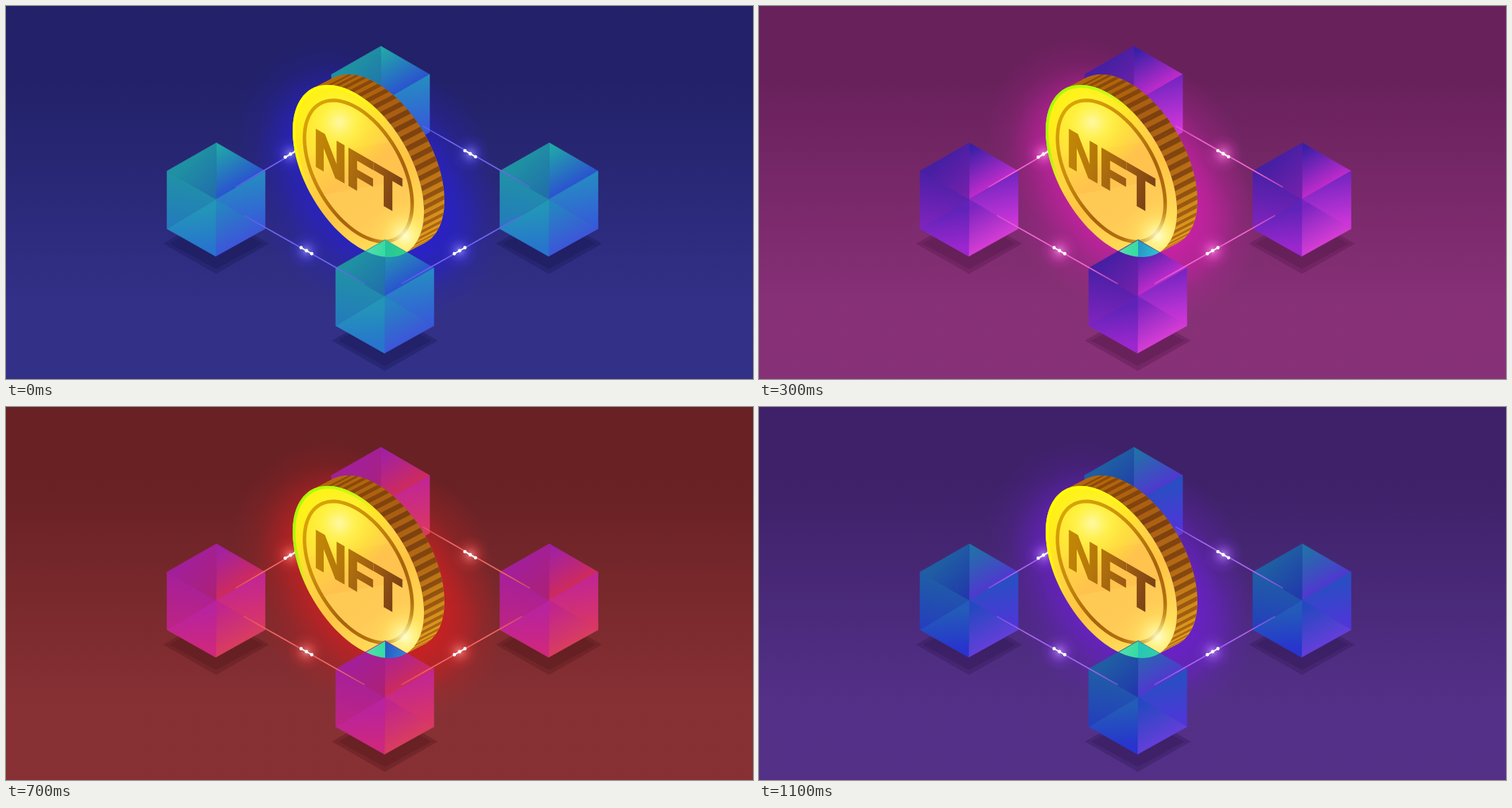
An HTML page with a canvas that plays this animation: 1058x529 px, repeating every 1200 ms.

```html
<!DOCTYPE html>
<html>
<head>
<meta charset="utf-8">
<style>
html, body { margin: 0; height: 100%; overflow: hidden; background: #22206a }
canvas { display: block }
</style>
</head>
<body>
<canvas id="stage" width="1058" height="529"></canvas>
<script>
const ctx = document.getElementById('stage').getContext('2d');
const TAU = Math.PI * 2;
let shift = 0;

const hue = (h, s, l, a = 1) => `hsl(${h + shift} ${s}% ${l}% / ${a})`;

function stops(g, colors) {
  colors.forEach((c, i) => g.addColorStop(i / (colors.length - 1), c));
  return g;
}
const linear = (x0, y0, x1, y1, ...colors) =>
  stops(ctx.createLinearGradient(x0, y0, x1, y1), colors);

function glow(x, y, r, ...colors) {
  ctx.fillStyle = stops(ctx.createRadialGradient(x, y, 0, x, y, r), colors);
  ctx.fillRect(x - r, y - r, 2 * r, 2 * r);
}

function poly(points, fill) {
  ctx.beginPath();
  points.forEach(p => ctx.lineTo(p[0], p[1]));
  ctx.closePath();
  ctx.fillStyle = fill;
  ctx.fill();
}

function background() {
  const top = hue(241, 52, 27), low = hue(241, 47, 36);
  ctx.fillStyle = linear(0, 0, 0, 529, top, top, hue(241, 50, 30), hue(241, 49, 33), low, low);
  ctx.fillRect(0, 0, 1058, 529);
  const halo = a => hue(243, 72, 46, a);
  glow(455, 180, 133, halo(.9), halo(.75), halo(.4), halo(.12), halo(0));
  glow(520, 250, 175, halo(1), halo(.95), halo(.75), halo(.25), halo(0));
  glow(575, 310, 133, halo(1), halo(.9), halo(.6), halo(.2), halo(0));
}

// Cube: six triangles around the middle of a hexagon
const corners = [[70, 0], [139, 40], [139, 122], [69, 161], [0, 122], [0, 40]];
const middle = [69.5, 80];
// gradient line, then hue and lightness at both ends
const faces = [
  [75, 5, 112, 68, 180, 39, 232, 51],
  [120, 45, 135, 115, 200, 45, 226, 53],
  [75, 90, 105, 145, 203, 45, 232, 55],
  [45, 95, 50, 150, 194, 43, 212, 48],
  [25, 50, 15, 120, 190, 39, 206, 44],
  [25, 30, 65, 75, 188, 38, 206, 40]
];

function shadow(x, y) {
  const cx = x + 69.5, cy = y + 143;
  for (const [w, h] of [[75, 43], [66, 36]])
    poly([[cx - w, cy], [cx, cy - h], [cx + w, cy], [cx, cy + h]], hue(241, 55, 22, .4));
}

function cube(x, y) {
  ctx.save();
  ctx.translate(x, y);
  faces.forEach(([x0, y0, x1, y1, h0, l0, h1, l1], i) => {
    const fill = linear(x0, y0, x1, y1, hue(h0, 68, l0), hue(h1, 68, l1));
    poly([corners[i], corners[(i + 1) % 6], middle], fill);
    ctx.strokeStyle = fill;
    ctx.lineWidth = .6;
    ctx.stroke();
  });
  ctx.restore();
}

function link(x0, y0, x1, y1, dx, dy) {
  const c = hue(244, 82, 67);
  ctx.strokeStyle = linear(x0, y0, x1, y1, hue(244, 82, 67, .5), c, c, c, hue(244, 82, 67, .5));
  ctx.lineWidth = 2;
  ctx.beginPath();
  ctx.moveTo(x0, y0);
  ctx.lineTo(x1, y1);
  ctx.stroke();
  glow(dx, dy, 27, hue(244, 95, 78, .75), hue(244, 90, 68, .4), hue(244, 85, 60, .13), hue(244, 80, 60, 0));
  const slope = (y1 - y0) / (x1 - x0);
  ctx.strokeStyle = ctx.fillStyle = '#fff';
  ctx.beginPath();
  ctx.moveTo(dx - 7.5, dy - 7.5 * slope);
  ctx.lineTo(dx + 7.5, dy + 7.5 * slope);
  ctx.stroke();
  for (const d of [-7.5, 0, 7.5]) {
    ctx.beginPath();
    ctx.arc(dx + d, dy + d * slope, 2.4, 0, TAU);
    ctx.fill();
  }
}

// Coin face: a tilted disc
const rim = (t, k = 1) => [
  499 + 93 * k * Math.cos(t),
  234 + k * (57 * Math.cos(t) + 108 * Math.sin(t))
];
function disc(k) {
  ctx.beginPath();
  for (let i = 0; i < 120; i++) ctx.lineTo(...rim(i / 120 * TAU, k));
  ctx.closePath();
}
const back = ([x, y]) => [x + 29, y - 15];

function coinEdge() {
  const start = -2.342, n = 54;
  const side = [];
  for (let i = 0; i <= n; i++) side.push(rim(start + Math.PI * i / n));
  const outer = side.map(back);
  poly([...side, ...outer.slice().reverse()],
    linear(450, 100, 600, 340, '#b5690a', '#a95e12', '#b56c14', '#e8a31e'));
  for (let i = 5; i < n - 2; i += 2)
    poly([side[i], side[i + 1], outer[i + 1], outer[i]],
      linear(480, 100, 610, 340, '#8d4a08', '#7c400f', '#854810', '#b87312'));
}

function coin() {
  coinEdge();
  const lime = 60 + 24 * Math.min(1, Math.max(0, (shift - 24) / 46));
  disc(1);
  ctx.fillStyle = linear(425, 125, 570, 345,
    '#fff312', '#ffe71d', '#ffd444', '#ffc342', '#ffd452', '#ffe35f');
  ctx.fill();

  ctx.save();
  ctx.clip();
  disc(.995);
  ctx.lineWidth = 7;
  ctx.strokeStyle = linear(415, 125, 500, 205,
    `hsl(${lime} 100% 50%)`, `hsl(${lime} 100% 50% / .8)`, 'rgba(255,240,0,0)');
  ctx.stroke();

  disc(.82);
  ctx.fillStyle = linear(430, 140, 560, 330, '#ffe71c', '#ffda3c', '#ffc34d', '#ffc250', '#ffd05b');
  ctx.fill();
  ctx.save();
  ctx.clip();
  poly([[400, 218], [600, 183], [600, 80], [400, 80]], 'rgba(255,230,90,.2)');
  poly([[400, 277], [600, 240], [600, 380], [400, 380]], 'rgba(255,222,100,.25)');
  ctx.restore();
  glow(472, 165, 75, 'rgba(255,255,190,.8)', 'rgba(255,252,80,.6)', 'rgba(255,245,40,.25)', 'rgba(255,235,40,0)');
  disc(.82);
  ctx.lineWidth = 5;
  ctx.strokeStyle = linear(425, 150, 575, 310, '#d9a506', '#c98c0b', '#a7620d', '#ba760e');
  ctx.stroke();
  glow(565, 326, 50, 'rgba(255,255,215,.95)', 'rgba(255,250,150,.6)', 'rgba(255,235,100,.2)', 'rgba(255,230,90,0)');
  ctx.restore();

  ctx.save();
  ctx.transform(.866, .5, 0, 1, 436, 225);
  ctx.font = 'bold 74px "Liberation Sans", Arial, sans-serif';
  ctx.lineWidth = 3.5;
  ctx.lineJoin = 'miter';
  ctx.fillStyle = ctx.strokeStyle = linear(0, -50, 145, 0, '#c58a05', '#b4770a', '#985813', '#6c3714');
  ctx.fillText('NFT', 0, 0);
  ctx.strokeText('NFT', 0, 0);
  ctx.restore();
}

// Tip of the coin seen through the front cube
function coinTip() {
  ctx.save();
  disc(1);
  ctx.clip();
  const right = 164 + shift * .48;
  poly([[537, 332], [537, 370], [470, 371]],
    linear(505, 345, 537, 350, 'hsl(155 65% 62%)', 'hsl(160 70% 53%)'));
  poly([[537, 332], [605, 371], [537, 370]],
    linear(537, 345, 575, 355, `hsl(${right} 68% 46%)`, `hsl(${right - 15} 65% 52%)`));
  ctx.restore();
}

function draw() {
  background();
  const left = [228, 194], right = [699.5, 194], front = [467, 331.5];
  [left, right, front].forEach(p => shadow(...p));
  cube(461, 57);
  cube(...left);
  cube(...right);
  link(325, 257, 470, 172, 403, 210);
  link(590, 170, 742, 257, 657.5, 209.5);
  coin();
  cube(...front);
  coinTip();
  link(337, 297, 508, 394, 425.5, 347);
  link(731, 297, 560, 394, 642.5, 347);
}

// The hue runs forth and back in twelve hard steps
let last = -1;
function tick(now) {
  const step = Math.floor(now % 1200 / 100);
  if (step !== last) {
    last = step;
    shift = 23.3 * (6 - Math.abs(6 - step));
    draw();
  }
  requestAnimationFrame(tick);
}
tick(0);
</script>
</body>
</html>
```
